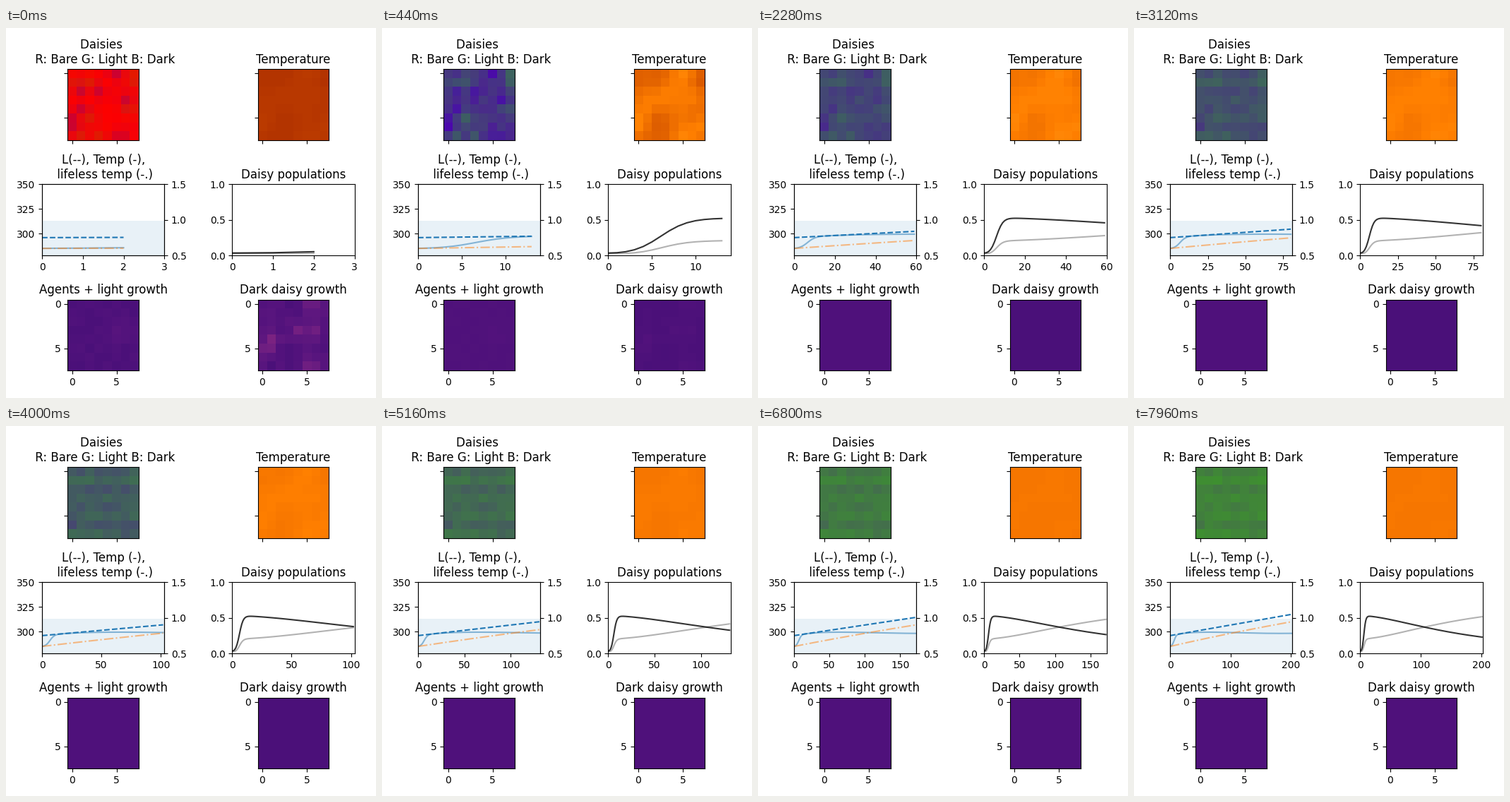
A matplotlib script that plays this animation: 524x524 px, repeating every 8000 ms.

```python
import numpy as np
import matplotlib.pyplot as plt
from matplotlib.animation import FuncAnimation

SIZE, FRAMES, STEP_MS, N = 524, 200, 40, 8
rng = np.random.default_rng(4)
rows, cols = np.mgrid[:N, :N]


def blobs(*centres, radius=0.6):
    """Grid of soft spots around (row, column) centres, each peaking at 1."""
    return np.max([np.exp(-((rows - r) ** 2 + (cols - c) ** 2) / (2 * radius ** 2))
                   for r, c in centres], axis=0)


def noise(low, high):
    return rng.uniform(low, high, (N, N))


def centred(grid):
    return grid - grid.mean()


def blur(grid):
    for axis in (0, 1):
        grid = (np.roll(grid, 1, axis) + 2 * grid + np.roll(grid, -1, axis)) / 4
    return grid


def ease(k, a, b):
    u = np.clip((k - a) / (b - a), 0, 1)
    return u * u * (3 - 2 * u)


def kelvin(absorbed):
    """Equilibrium temperature for a solar constant of 1000 W/m2."""
    return (1000 * absorbed / 5.67e-8) ** 0.25


# Populations grow logistically, then light daisies slowly displace dark ones
step = np.arange(FRAMES + 2)
rise = 1 / (1 + np.exp(-0.62 * (step - 6)))
plateau = 0.532 / (1 + (step / 171) ** 1.72)
start = np.exp(-step / 3)
dark = rise * plateau + 0.02 * start
light = rise * (0.733 + 0.00006 * step - plateau) + 0.025 * start

# Temperature lags behind the radiative balance
lum = 0.75 + 0.00149 * step
lifeless = kelvin(lum * 0.5)
temp = kelvin(lum * (0.5 + 0.25 * (dark - light)))
for i in step[1:]:
    temp[i] = (temp[i - 1] + temp[i]) / 2

# Spatial patterns: positive favours light daisies, negative dark ones
light_spots = blobs((0, 7), (1, 0.5), (1, 2), (1, 7), (4, 6.5), (5, 2), (7, 1), (7, 3))
dark_spots = blobs((0, 5), (2, 1), (2, 3), (3, 6), (4, 1), (5, 0), (6, 0), (7, 5.5))
light_seed = light_spots + noise(0, 0.1)
dark_seed = dark_spots + noise(0, 0.2)
early = centred(light_spots - 0.8 * dark_spots + noise(-0.25, 0.25))
late = centred(0.5 * (rows % 2) + 0.4 * early + noise(-0.4, 0.4))
heat = centred(blur(early))
heat /= np.abs(heat).max()
dark_glow = blobs((0, 5.5), (3, 4), (3, 5.5), (4, 1), (5, 0.5), (7, 5.5)) + noise(-0.1, 0.3)
light_glow = blobs((3, 5.5), radius=1) + noise(-0.4, 0.2)


def daisies(k):
    pattern = early + (late - early) * ease(k, 25, 115)
    pattern = pattern * (0.06 + 0.13 * np.exp(-k / 60))
    seeded = np.exp(-k / 2.5)

    def share(mean, seed, shift):
        return np.clip(seeded * mean * seed / seed.mean()
                       + (1 - seeded) * (mean + shift), 0, 1)

    g = share(light[k + 2], light_seed, pattern)
    b = share(dark[k + 2], dark_seed, -0.8 * pattern)
    return np.clip(np.dstack([1 - g - b, g, b]), 0, 1)


def warmth(k):
    grown = 1 - np.exp(-k / 5)
    return temp[k + 2] - heat * (0.8 * (1 - grown) + 6 * np.exp(-k / 57) * grown)


def light_growth(k):
    return 0.247 + 0.005 * ease(k, 0, 15) * np.exp(-k / 60) + light_glow * 0.025 * np.exp(-k / 8)


def dark_growth(k):
    dip = ease(k, 0, 15) - ease(k, 80, 150)
    return 0.249 - 0.012 * dip + dark_glow * 0.085 * np.exp(-k / 6)


fig = plt.figure(figsize=(SIZE / 100, SIZE / 100), dpi=100, facecolor="white")
WIDTH, HEIGHT = 173.1, 100.6


def panel(row, col, title, square=False):
    w = HEIGHT if square else WIDTH
    x = 51.1 + 269.35 * col + (WIDTH - w) / 2
    y = SIZE - (58.2 + 163.2 * row + HEIGHT)
    ax = fig.add_axes([x / SIZE, y / SIZE, w / SIZE, HEIGHT / SIZE])
    ax.set_title(title, y=1.0)
    return ax


def grid_panel(row, col, title, field, labels=True, **kw):
    ax = panel(row, col, title, square=True)
    im = ax.imshow(field(0), aspect="auto", interpolation="nearest", **kw)
    ax.set_xticks([0, 5])
    ax.set_yticks([0, 5])
    ax.tick_params(labelbottom=labels, labelleft=labels)
    return im, field


def scale(ax, low, high, ticks):
    ax.set_ylim(low, high)
    ax.set_yticks(ticks)


magma = dict(cmap="magma", vmin=0, vmax=1)
images = [
    grid_panel(0, 0, "Daisies \n R: Bare G: Light B: Dark", daisies, False),
    grid_panel(0, 1, "Temperature", warmth, False, cmap="afmhot", vmin=250, vmax=350),
    grid_panel(2, 0, "Agents + light growth", light_growth, **magma),
    grid_panel(2, 1, "Dark daisy growth", dark_growth, **magma),
]

ax_temp = panel(1, 0, "L(--), Temp (-),\n lifeless temp (-.)")
ax_temp.axhspan(278.15, 313.15, color="tab:blue", alpha=0.1, lw=0)
scale(ax_temp, 278.15, 350, [300, 325, 350])
ax_lum = ax_temp.twinx()
scale(ax_lum, 0.5, 1.5, [0.5, 1, 1.5])
ax_pop = panel(1, 1, "Daisy populations")
scale(ax_pop, 0, 1, [0, 0.5, 1])

lines = [
    (ax_temp.plot([], [], color="tab:blue", alpha=0.5)[0], temp),
    (ax_temp.plot([], [], "-.", color="tab:orange", alpha=0.5)[0], lifeless),
    (ax_lum.plot([], [], "--", color="tab:blue")[0], lum),
    (ax_pop.plot([], [], color="black", alpha=0.3)[0], light),
    (ax_pop.plot([], [], color="black", alpha=0.8)[0], dark),
]


def update(k):
    for im, field in images:
        im.set_data(field(k))
    for line, series in lines:
        line.set_data(step[:k + 3], series[:k + 3])
    for ax in (ax_temp, ax_pop):
        ax.set_xlim(0, k + 3)
    return []


anim = FuncAnimation(fig, update, frames=FRAMES, interval=STEP_MS, init_func=lambda: update(0),
                     repeat=True, repeat_delay=0, cache_frame_data=False)
plt.show()
```
